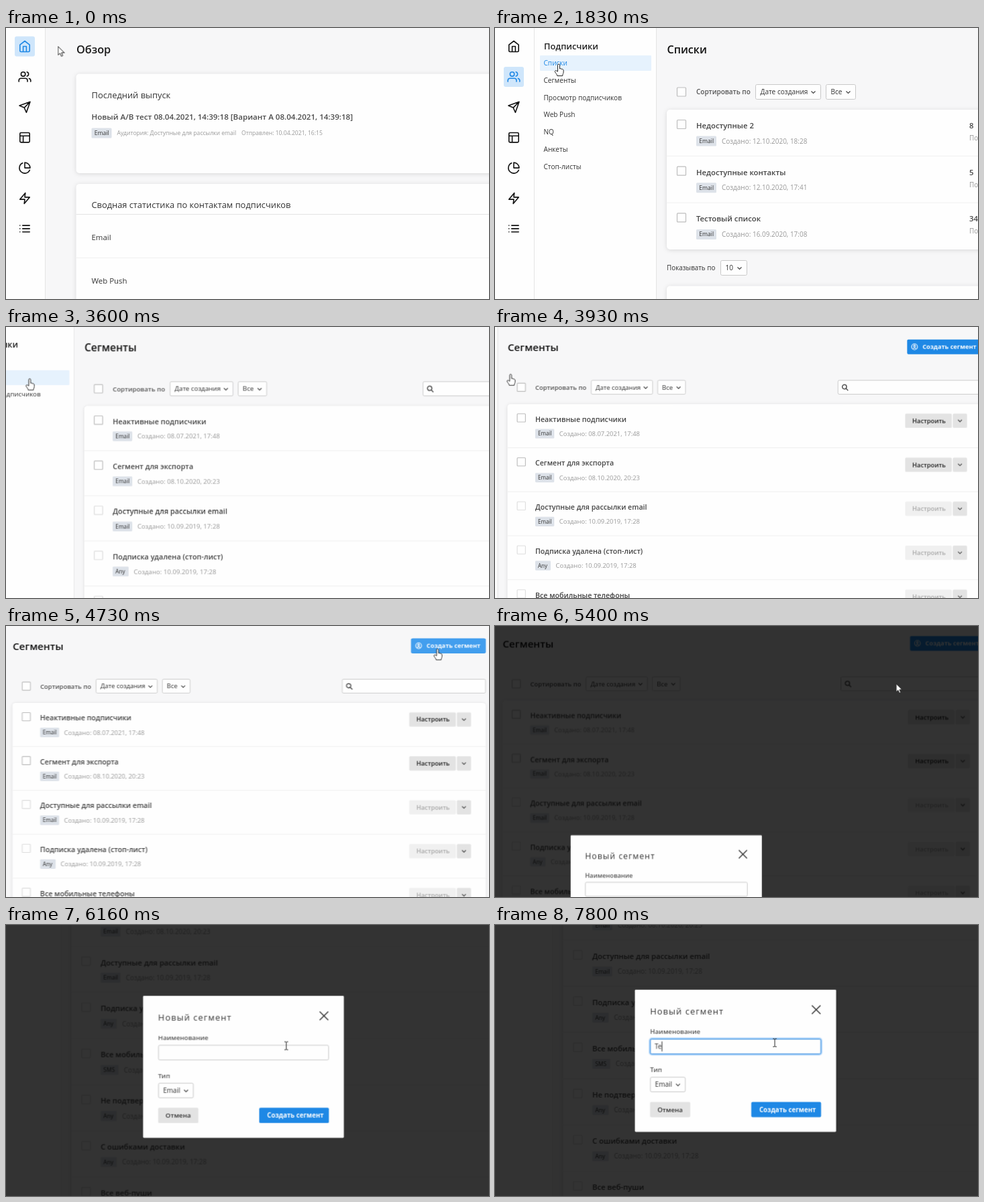
An HTML page that plays this animation: 720 px wide and 405 px high, repeating every 8 s.

```html
<!DOCTYPE html>
<html lang="ru">
<head>
<meta charset="utf-8">
<title>Сегменты</title>
<style>
html, body { margin: 0; width: 100%; height: 100%; overflow: hidden; background: #f7f7f8; }
svg { display: block; width: 100vw; height: 100vh; font-family: "Open Sans", "Noto Sans", sans-serif; }
.card { fill: #fefefe; filter: drop-shadow(0 1px 3px rgba(0, 0, 0, .13)); }
.panel { fill: #fefefe; }
.rule { stroke: #f0f0f0; }
.edge { stroke: #e4e4e4; }
.field { fill: #fefefe; stroke: #c9c9c9; }
.icon { fill: none; stroke-width: 2; stroke-linecap: round; stroke-linejoin: round; }
.pointer { fill: #fff; stroke: #222; stroke-linejoin: round; }
#camera { animation: camera 8s cubic-bezier(.37, 0, .63, 1) infinite; }
#cursor { animation: cursor 8s cubic-bezier(.37, 0, .63, 1) infinite; }
#dialog { animation: dialog 8s linear infinite; }
@keyframes camera {
  0%, 38.35% { transform: translate(0px, 0px) scale(1); }
  50.65%, 66.55% { transform: translate(-231.4px, 0px) scale(.941); }
  78.62%, 100% { transform: translate(-152.3px, -236.3px) scale(.991); }
}
@keyframes cursor {
  0%, 2.5% { transform: translate(77.5px, 27.5px); }
  8.25%, 19.5% { transform: translate(31px, 72px); }
  22.875% { transform: translate(95px, 54px); }
  29.5%, 30% { transform: translate(165px, 56px); }
  31.25%, 46.5% { transform: translate(172px, 80px); }
  58.25% { transform: translate(929.5px, 36.3px); }
  66.6% { transform: translate(929.5px, 36.3px); animation-timing-function: cubic-bezier(.333, .422, .667, .755); }
  71.625% { transform: translate(703.6px, 304px); animation-timing-function: cubic-bezier(.333, .667, .667, 1); }
  78.4%, 100% { transform: translate(574.5px, 416px); }
}
@keyframes dialog {
  0%, 62.3% { opacity: 0; }
  64.1%, 100% { opacity: 1; }
}
</style>
</head>
<body>
<script>
const LOOP = 8000;
const BLUE = '#1e88e5';
let rules = '';
let ruleCount = 0;

// Shows content only between alternating on/off times (ms).
function during(times, content) {
  const name = `show${ruleCount++}`;
  const steps = times.map((ms, i) => `${ms / LOOP * 100}% { opacity: ${1 - i % 2}; }`);
  rules += `@keyframes ${name} { 0% { opacity: 0; } ${steps.join(' ')} }\n`;
  return `<g style="animation: ${name} ${LOOP}ms step-end infinite">${content}</g>`;
}

// Text placed by its left edge and the middle of its capitals.
const text = (x, middle, string, size, fill = '#333', weight = 400, spacing = 0) =>
  `<text x="${x}" y="${middle + size * .36}" font-size="${size}" fill="${fill}" font-weight="${weight}" letter-spacing="${spacing}">${string}</text>`;
const box = (x, y, w, h, attrs = '', r = 2) =>
  `<rect x="${x}" y="${y}" width="${w}" height="${h}" rx="${r}" ${attrs}/>`;
const line = (x1, y1, x2, y2, cls = 'rule') =>
  `<line x1="${x1}" y1="${y1}" x2="${x2}" y2="${y2}" class="${cls}"/>`;
const chevron = (x, y) =>
  `<path d="M${x - 3} ${y - 1.5}l3 3 3-3" fill="none" stroke="#444" stroke-width="1.2"/>`;
const checkbox = (y, stroke = '#bdbdbd') =>
  box(271.5, y - 6.5, 13, 13, `fill="#fefefe" stroke="${stroke}" stroke-width="1.2"`, 1);
const select = (x, y, w, label) =>
  box(x + .5, y + .5, w - 1, 22, 'class="field"') + text(x + 7.5, y + 11.5, label, 10.1) + chevron(x + w - 11.5, y + 12);

const badgeWidths = { Email: 30, Any: 24.4, SMS: 27 };
const badge = (x, y, label) =>
  box(x, y - 7.5, badgeWidths[label], 15, 'fill="#dde2e9"', 1.5) + text(x + 4.2, y, label, 8.6);

const icons = [
  'M3 9l9-7 9 7v11a2 2 0 0 1-2 2H5a2 2 0 0 1-2-2zM9 22V12h6v10',
  'M17 21v-2a4 4 0 0 0-4-4H5a4 4 0 0 0-4 4v2M5 7a4 4 0 1 0 8 0a4 4 0 1 0-8 0M23 21v-2a4 4 0 0 0-3-3.87M16 3.13a4 4 0 0 1 0 7.75',
  'M22 2L11 13M22 2l-7 20-4-9-9-4z',
  'M5 3h14a2 2 0 0 1 2 2v14a2 2 0 0 1-2 2H5a2 2 0 0 1-2-2V5a2 2 0 0 1 2-2zM3 9h18M9 21V9',
  'M21.21 15.89A10 10 0 1 1 8 2.83M22 12A10 10 0 0 0 12 2v10z',
  'M13 2L3 14h9l-1 8 10-12h-9z',
  'M8 6h13M8 12h13M8 18h13M3 6h.01M3 12h.01M3 18h.01'
];
const navY = i => 27.5 + i * 45.4;
const icon = (i, color) =>
  `<path d="${icons[i]}" class="icon" stroke="${color}" transform="translate(18.4 ${navY(i) - 9.6}) scale(.8)"/>`;
const activeIcon = i => box(13, navY(i) - 15, 30, 30, 'fill="#cfe6fb"', 3) + icon(i, BLUE);

const sidebar = box(-20, -20, 78.5, 720, 'class="panel"', 0) + line(58.5, 0, 58.5, 700, 'edge') +
  icons.map((_, i) => icon(i, '#111')).join('') +
  during([0, 1300], activeIcon(0)) + during([490], activeIcon(1));

const overview =
  text(105, 32.5, 'Обзор', 16.3, '#1a1a1a', 600) +
  box(104.5, 68.5, 700, 148.5, 'class="card"', 5) +
  text(127.5, 100, 'Последний выпуск', 12.9) +
  text(127.5, 133, 'Новый A/B тест 08.04.2021, 14:39:18 [Вариант A 08.04.2021, 14:39:18]', 11.58, '#4a4a4a', 600) +
  badge(127.5, 157, 'Email') +
  text(165.5, 157, 'Аудитория: Доступные для рассылки email', 8.6, '#999') +
  text(351, 157, 'Отправлен: 10.04.2021, 16:15', 8.6, '#999') +
  box(104.5, 233, 700, 300, 'class="card"', 5) +
  text(127.5, 264, 'Сводная статистика по контактам подписчиков', 12.85) +
  line(104.5, 278.5, 760, 278.5, 'edge') +
  text(127.5, 313, 'Email', 11.4) + line(104.5, 343.5, 760, 343.5) +
  text(127.5, 378, 'Web Push', 11.4);

const menuY = i => 52.3 + i * 25.8;
const menuItem = (i, label, color) => text(72.5, menuY(i), label, 10.1, color);
const highlight = i => box(67, menuY(i) - 11.3, 166, 23, 'fill="#e6f2fd"', 1);
const menuLabels = ['Списки', 'Сегменты', 'Просмотр подписчиков', 'Web Push', 'NQ', 'Анкеты', 'Стоп-листы'];
const menu = box(59, -20, 181.5, 720, 'class="panel"', 0) + line(240.5, 0, 240.5, 700, 'edge') +
  text(73, 27.5, 'Подписчики', 12.8, '#222', 600) +
  during([1720, 2450], highlight(0)) + during([2450], highlight(1)) +
  menuLabels.map((label, i) => i > 1 ? menuItem(i, label) : '').join('') +
  during([0, 3030], menuItem(0, 'Списки', BLUE)) + during([3030], menuItem(0, 'Списки')) +
  during([0, 2450], menuItem(1, 'Сегменты')) + during([2450], menuItem(1, 'Сегменты', BLUE));

const PITCH = 69.7;
const heading = title => text(256.5, 32.1, title, 16.1, '#111', 600) +
  checkbox(95.5) + text(300, 95.8, 'Сортировать по', 10, '#555', 600) +
  select(388, 84, 98, 'Дате создания') + select(493, 84, 45, 'Все');

function row(i, title, kind, date, disabled) {
  const y = 146 + i * PITCH;
  return (i ? line(256, y - 24.4, 1006, y - 24.4) : '') +
    checkbox(y - 2, disabled ? '#dedede' : '#bdbdbd') +
    text(300, y, title, 11.3, '#444', 600) + badge(300, y + 23, kind) +
    text(308 + badgeWidths[kind], y + 23, `Создано: ${date}`, 9.98, '#999');
}

const lists = [
  ['Недоступные 2', '12.10.2020, 18:28', 8],
  ['Недоступные контакты', '12.10.2020, 17:41', 5],
  ['Тестовый список', '16.09.2020, 17:08', 34]
];
const listPage = heading('Списки') + box(256, 122, 750, 209, 'class="card"', 5) +
  lists.map(([title, date, count], i) => row(i, title, 'Email', date) +
    text(707, 146 + i * PITCH, count, 11.3, '#444', 600) +
    text(707, 164.5 + i * PITCH, 'Подписчики', 9.98, '#999')).join('') +
  text(256, 358.5, 'Показывать по', 9.9) + select(336, 347, 40, '10') +
  box(256, 385.5, 750, 200, 'class="card"', 5);

const oldDate = '10.09.2019, 17:28';
const segments = [
  ['Неактивные подписчики', 'Email', '08.07.2021, 17:48'],
  ['Сегмент для экспорта', 'Email', '08.10.2020, 20:23'],
  ['Доступные для рассылки email', 'Email', oldDate],
  ['Подписка удалена (стоп-лист)', 'Any', oldDate],
  ['Все мобильные телефоны', 'SMS', oldDate],
  ['Не подтвердившие подписку', 'Any', oldDate],
  ['С ошибками доставки', 'Any', oldDate],
  ['Все веб-пуши', 'Any', oldDate]
];
function rowButtons(i) {
  const y = 148.5 + i * PITCH;
  const disabled = i > 1;
  return box(884.6, y - 11.3, 73.8, 22.6, `fill="${disabled ? '#f0f0f0' : '#e3e3e3'}"`) +
    text(896, y, 'Настроить', 9.87, disabled ? '#a9a9a9' : '#222', 600) +
    box(960, y - 11.3, 22.5, 22.6, 'fill="#e3e3e3"') + chevron(971.3, y);
}
const createFill = color => box(887.8, 19.7, 117.8, 23.4, `fill="${color}"`);
const rightColumn = box(778.5, 84.5, 227, 22, 'class="field"') +
  '<path d="M791.5 97.7l3 3M785.3 94.8a3.4 3.4 0 1 0 6.8 0a3.4 3.4 0 1 0-6.8 0" fill="none" stroke="#555" stroke-width="1.6"/>' +
  createFill(BLUE) + during([4560, 5100], createFill('#429eee')) +
  '<g fill="none" stroke="#fff" stroke-width="1.2"><circle cx="899.5" cy="31.3" r="4.6"/><circle cx="899.5" cy="30" r="1.4"/><path d="M897 34.2q2.5-2.4 5 0"/></g>' +
  text(912, 31.3, 'Создать сегмент', 9.77, '#fff', 700) +
  segments.map((_, i) => rowButtons(i)).join('');

// The page grows by the scrollbar's width while the dialog is open.
const segmentPage = scrollbar => heading('Сегменты') +
  box(256, 122, 750 + scrollbar, 640, 'class="card"', 5) +
  segments.map(([title, kind, date], i) => row(i, title, kind, date, i > 1)).join('') +
  `<g transform="translate(${scrollbar})">${rightColumn}</g>`;

const caret = x => box(x, 414, 1, 15, 'fill="#222"', 0);
const typed = (string, caretX) => text(393.8, 421.7, string, 10.1) + caret(caretX);
const dialog = box(-100, -100, 1300, 1000, 'fill="#000" fill-opacity=".8"', 0) +
  box(364, 335.8, 302.7, 214.6, 'class="card"', 1.5) +
  text(386.8, 368.9, 'Новый сегмент', 13, '#333', 400, 1.1) +
  '<path d="M630.2 359.6l13 13m0-13l-13 13" stroke="#333" stroke-width="1.5"/>' +
  text(386.8, 399.4, 'Наименование', 9.8, '#555', 600) +
  box(387.3, 410.5, 256.4, 22.2, 'class="field"') +
  during([6530],
    box(386.6, 409.8, 257.8, 23.6, 'fill="none" stroke="#a9d2fa" stroke-width="3"', 3) +
    box(387.3, 410.5, 256.4, 22.2, 'fill="#fefefe" stroke="#2b85dc"')) +
  during([6530, 7060, 7560, 7600], caret(393.6)) +
  during([7600, 7800], typed('Т', 399.2)) + during([7800], typed('Те', 404.3)) +
  text(386.8, 456.4, 'Тип', 9.8, '#555', 600) + select(386.8, 467.4, 53.5, 'Email') +
  box(386.8, 505.1, 60.5, 23, 'fill="#e3e3e3"') + text(397.9, 516.7, 'Отмена', 9.8, '#333', 600) +
  box(539.1, 505.1, 105, 23, `fill="${BLUE}"`) + text(551, 516.7, 'Создать сегмент', 9.77, '#fff', 700);

const arrow = '<path class="pointer" d="M0 0V13l3-2.8 2 4.6 2.2-1-2-4.4h4.2z"/>';
const hand = '<path class="pointer" d="M-1.5 11V1.5a1.5 1.5 0 0 1 3 0V7a1.4 1.4 0 0 1 2.4.6a1.3 1.3 0 0 1 2.2.6a1 1 0 0 1 1 .9V12c0 2-1.4 3-1.4 5.5H-2.2c-.3-2.4-2-3.4-3.4-6a1.4 1.4 0 0 1 2.2-1.6z"/>';
const beam = '<path d="M-2.8-6H-.6L0-5.4.6-6H2.8M-2.8 6H-.6L0 5.4.6 6H2.8M0-5.4V5.4" fill="none" stroke="#222"/>';
const cursor = during([0, 480, 1630, 1740, 3960, 4540, 5100, 6090], arrow) +
  during([480, 1630, 1740, 3960, 4540, 5100], hand) + during([6090], beam);

const scene = box(-100, -100, 1300, 1000, 'fill="#f7f7f8"', 0) +
  during([0, 1300], overview) + during([1300, 3030], listPage) +
  during([3030, 5000], segmentPage(0)) + during([5000], segmentPage(13.5)) +
  during([1300], menu) + sidebar +
  `<g id="dialog">${dialog}</g><g id="cursor">${cursor}</g>`;

document.head.insertAdjacentHTML('beforeend', `<style>${rules}</style>`);
document.body.insertAdjacentHTML('beforeend', `<svg viewBox="0 0 720 405"><g id="camera">${scene}</g></svg>`);
</script>
</body>
</html>
```
